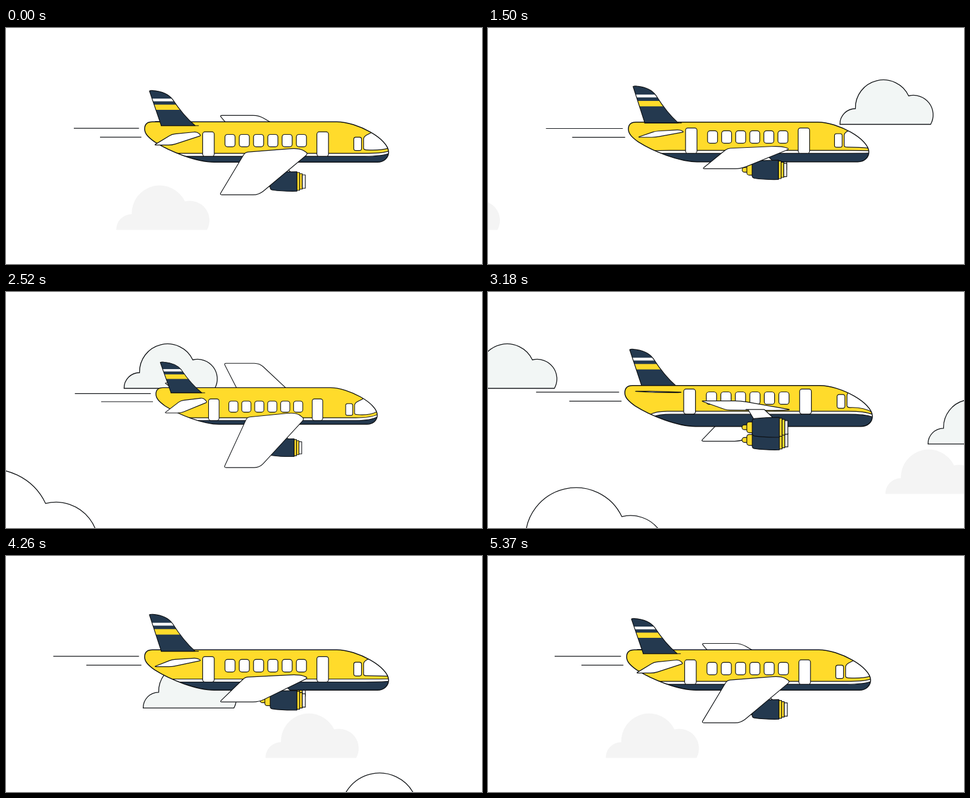
Recreate the animation shown at these times as an HTML page with a canvas. Size 800x398 px, loop 5400 ms.

```html
<!DOCTYPE html>
<html lang="en">
<head>
<meta charset="utf-8">
<title>Flying plane</title>
<style>
  html, body { margin: 0; height: 100%; overflow: hidden; background: #fff; }
  canvas { display: block; width: 800px; height: 398px; }
</style>
</head>
<body>
<canvas id="stage"></canvas>
<script>
const LOOP = 5400;
const YELLOW = '#ffdb2b', NAVY = '#24394f', WHITE = '#fff', INK = '#0c0f12';
const MIST = '#f2f6f5', GREY = '#f4f4f4';

const canvas = document.getElementById('stage');
const ctx = canvas.getContext('2d');
const ratio = window.devicePixelRatio || 1;
canvas.width = 800 * ratio;
canvas.height = 398 * ratio;

const smooth = k => (1 - Math.cos(Math.PI * k)) / 2;
const straight = k => k;

// Value of a [time, value] track at time t.
function track(keys, t, ease = smooth) {
  if (t <= keys[0][0]) return keys[0][1];
  for (let i = 1; i < keys.length; i++) {
    const [t0, a] = keys[i - 1], [t1, b] = keys[i];
    if (t <= t1) return a + (b - a) * ease((t - t0) / (t1 - t0));
  }
  return keys[keys.length - 1][1];
}

// Roll: -1 near wing up, 0 level, 1 near wing down.
const ROLL = [[0, .69], [590, -.09], [1190, .69], [2010, -1], [2520, 1],
  [3080, -.47], [3850, .55], [4720, -.09], [5385, .69]];
const SCALE = [[1200, 1], [2400, .903], [3450, 1.035], [4200, 1]];
const TRAIL_A = [[0, 114], [480, 92], [930, 102], [2010, 84.5], [2200, 76],
  [2520, 82.8], [3180, 86], [4260, 79.5], [4520, 68], [5370, 112], [5400, 114]];
const TRAIL_B = [[0, 158], [480, 134], [930, 141], [2010, 134], [2520, 131.5],
  [3180, 141], [4260, 135], [5370, 157], [5400, 158]];
const MID_A = [[930, 799], [2010, 406.5], [2520, 198.8], [3180, -40.5], [3520, -164]];
const MID_B = [[3030, 802], [3180, 740], [3420, 641], [4260, 231], [5160, -158]];

let roll = 0;
const pose = (up, level, down) => level + roll * (roll < 0 ? level - up : down - level);

function paint(path, fill, stroke = INK) {
  if (fill) { ctx.fillStyle = fill; ctx.fill(path); }
  if (stroke) { ctx.strokeStyle = stroke; ctx.stroke(path); }
}

function shape(d, fill, stroke) { paint(new Path2D(d), fill, stroke); }

function box(x, y, w, h, radius, fill) {
  const p = new Path2D();
  p.roundRect(x, y, w, h, radius);
  paint(p, fill);
}

// Polygon with each corner softened by its own cut length.
function softPolygon(points, cuts) {
  const p = new Path2D(), n = points.length;
  const toward = (a, b, cut) => {
    const len = Math.hypot(b[0] - a[0], b[1] - a[1]) || 1;
    const k = Math.min(cut / len, .45);
    return [a[0] + (b[0] - a[0]) * k, a[1] + (b[1] - a[1]) * k];
  };
  points.forEach((pt, i) => {
    const start = toward(pt, points[(i + n - 1) % n], cuts[i]);
    const end = toward(pt, points[(i + 1) % n], cuts[i]);
    if (i) p.lineTo(...start); else p.moveTo(...start);
    p.quadraticCurveTo(...pt, ...end);
  });
  p.closePath();
  return p;
}

function wing(tip, root, mid, front) {
  paint(softPolygon([[359, tip], [425, tip], [508, front], [493, mid], [402, root]],
    [4, 10, 5, 16, 5]), WHITE);
}

function tailplane(tip, root, mid, front) {
  paint(softPolygon([[249, tip], [279, tip], [328, front], [321, mid], [279, root]],
    [3, 6, 3, 5, 5]), WHITE);
}

function engine(e) {
  shape(`M433 ${e - 46}H464L480 ${e - 31}L448 ${e - 28}L437 ${e - 46}`, WHITE);
  box(427, e - 20.5, 11, 8, 4, YELLOW);
  box(435, e - 25.5, 13, 18, 4, YELLOW);
  shape(`M444 ${e - 27}Q444 ${e - 30} 448 ${e - 31}Q466 ${e - 33} 489 ${e - 33}V${e}
    Q466 ${e + .5} 448 ${e - 2}Q444 ${e - 3} 444 ${e - 6}Z`, NAVY);
  box(489, e - 31.5, 4.5, 30, 0, YELLOW);
  box(493.5, e - 29.5, 4.5, 26, 0, YELLOW);
  box(498, e - 27.5, 5, 22.5, 0, WHITE);
}

function fin() {
  const top = pose(103, 94, 110.5), base = pose(160, 158, 167.5);
  const y = f => top + f * (base - top);
  const outline = new Path2D(`M241 ${y(.01)}Q243 ${y(-.01)} 248 ${y(0)}
    C262 ${y(.02)} 273 ${y(.1)} 280 ${y(.25)}C289 ${y(.48)} 301 ${y(.76)} 318 ${y(1)}H261Z`);
  paint(outline, NAVY, null);
  ctx.save();
  ctx.clip(outline);
  ctx.fillStyle = WHITE;
  ctx.fillRect(235, y(.228), 90, y(.305) - y(.228));
  ctx.fillStyle = YELLOW;
  ctx.fillRect(235, y(.4), 90, y(.548) - y(.4));
  ctx.restore();
  paint(outline);
  if (roll >= 0) shape(`M260 ${base}H324`);
}

function fuselage() {
  const hull = new Path2D(`M246 158H556C590 158 643 187 643 209C643 219 635 226 624 226
    H350C320 226 275 208 250 192C239 184 233 178 233 170C233 162 238 158 246 158Z`);
  const s = pose(195, 205, 214);
  const edge = (y, x, leftY, rightY) =>
    `M255 ${leftY}H${x}Q${x + 11} ${y} ${x + 30} ${y}H603Q633 ${y} 645 ${rightY}V240H255Z`;
  paint(hull, YELLOW, null);
  ctx.save();
  ctx.clip(hull);
  shape(edge(s, 273, Math.max(s, 207), 207), WHITE);
  shape(edge(s + 5, 279, Math.max(s + 5, 210), 211), NAVY);

  const top = pose(165, 175, 187), bottom = pose(188, 199.5, 208);
  shape(`M616 ${top - 8}L606 ${top - 3}Q601 ${top} 601 ${top + 4}V${bottom - 3}
    Q601 ${bottom} 606 ${bottom}Q628 ${bottom + 2 * roll} 643 202.5L660 202V150H616Z`, WHITE);
  ctx.restore();
  ctx.lineWidth = 1.5;
  paint(hull);
  ctx.lineWidth = 1.2;

  const pane = (x, w, y0, y1, radius) => box(x, y0, w, y1 - y0, radius, WHITE);
  pane(584.5, 13, pose(169, 176, 187.6), pose(190.8, 199.5, 209.6), 3.5);
  for (const x of [330.5, 522.5]) pane(x, 19.5, pose(161, 166, 179), pose(199.5, 210, 219), 4);
  for (let i = 0; i < 6; i++)
    pane(368 + 24 * i, 17, pose(165.5, 171, 183), pose(185, 192.5, 203.5), 4.5);
}

function plane(t) {
  roll = track(ROLL, t);
  const k = track(SCALE, t);
  ctx.save();
  ctx.translate(438, 192.2);
  ctx.scale(k, k);
  ctx.translate(-438, -192);
  ctx.lineWidth = 1.2;
  ctx.lineJoin = 'round';

  shape(`M${track(TRAIL_A, t)} 169H223.5M${track(TRAIL_B, t)} 184H227.5`);

  const farRoot = pose(213, 200, 197);
  wing(pose(286, 224, 112.7), farRoot, farRoot, pose(221, 207, 191));
  engine(pose(285, 250, 215));
  tailplane(pose(204.5, 177, 149), pose(186, 175, 170), pose(184, 175, 170), pose(184, 175, 170));
  if (roll < 0) fin();
  fuselage();
  if (roll >= 0) fin();
  tailplane(pose(151, 180, 205), pose(166, 172, 182), pose(169.5, 170, 177), pose(164, 173, 185));

  const nearWing = () =>
    wing(pose(128, 225, 306.5), pose(196, 201, 213), pose(201, 198, 204), pose(194, 201.5, 216));
  const nearEngine = () => engine(pose(235, 250.6, 286));
  if (roll < -.25) { nearWing(); nearEngine(); }
  else { nearEngine(); nearWing(); }
  ctx.restore();
}

const CLOUD = 'M0 0A26 26 0 0 1 26 -26.5A47 47 0 0 1 115.5 -48A33 33 0 0 1 152.5 0Z';

// x, y is the left end of the flat base.
function cloud(x, y, fill, stroke, size = 1) {
  if (x > 802 || x < -160 * size) return;
  ctx.save();
  ctx.translate(x, y);
  ctx.scale(size, size);
  ctx.lineWidth = 1.3 / size;
  shape(CLOUD, fill, stroke);
  ctx.restore();
}

// Foreground cloud, placed by the centre and radius of its big lobe.
function nearCloud(t, time, x, y, radius) {
  const size = radius / 47;
  cloud(x - 1.268 * (t - time) - 73 * size, y + 28 * size, WHITE, INK, size);
}

function draw(t) {
  ctx.setTransform(ratio, 0, 0, ratio, 0, 0);
  ctx.fillStyle = WHITE;
  ctx.fillRect(0, 0, 800, 398);

  cloud((t < 2000 ? 185.5 : 1350.5) - .2146 * t, 340.5, GREY, null);
  if (t > 900) cloud(track(MID_A, t, straight), 162.5, MIST, INK);
  if (t > 3000) cloud(track(MID_B, t, straight), 256.3, MIST, INK);
  plane(t);
  nearCloud(t, 930, 149.3, 415, 85);
  nearCloud(t, 2010, 623.2, 399.7, 101);
  nearCloud(t, 3180, 149.3, 415, 85);
  nearCloud(t, 4260, 629, 431, 65);
}

function frame() {
  draw(performance.now() % LOOP);
  requestAnimationFrame(frame);
}
frame();
</script>
</body>
</html>
```
